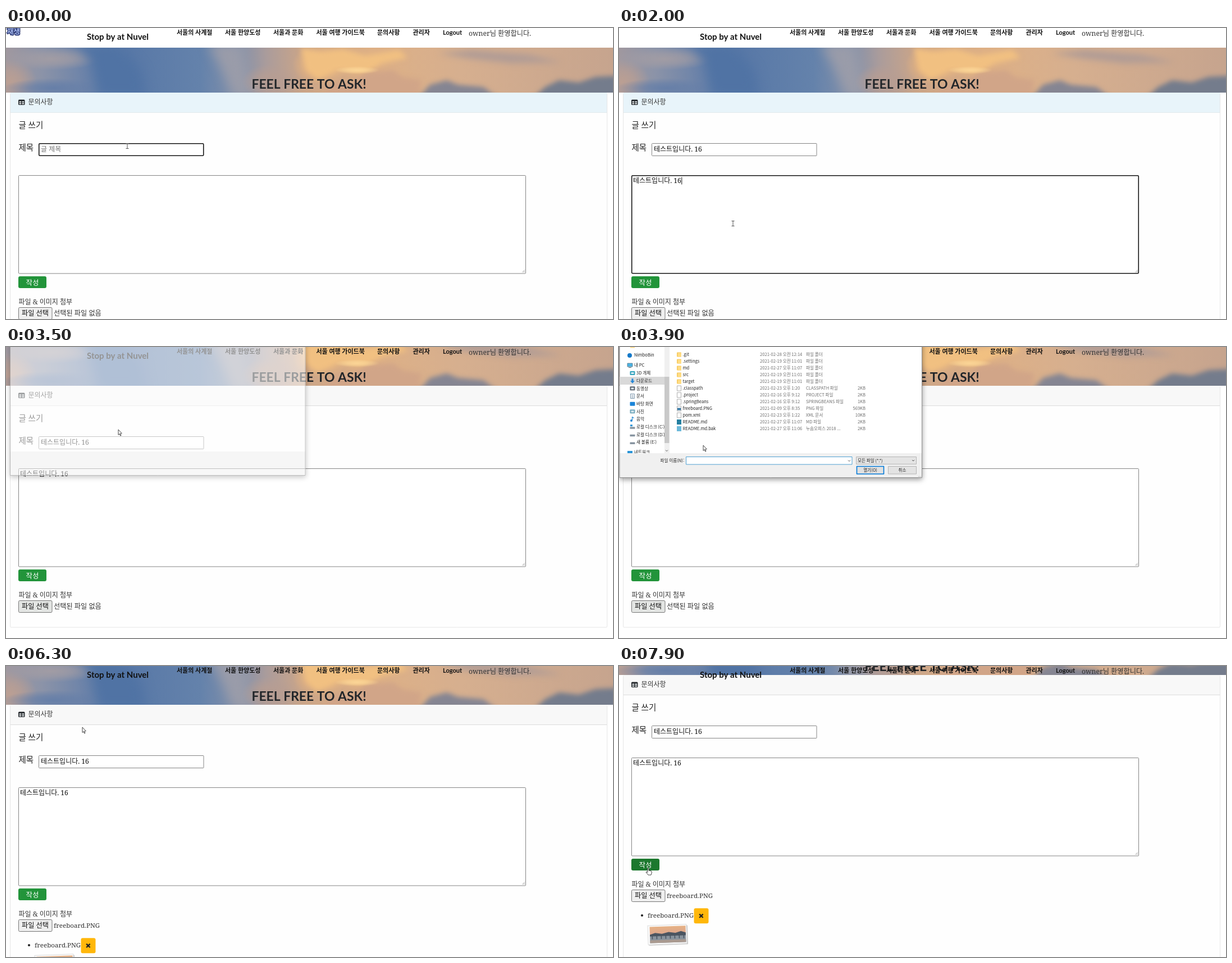
Recreate the animation shown at these times as an HTML page with a canvas. Size 1081 by 518 pixels, loop 8 s.

```html
<!DOCTYPE html>
<html lang="ko">
<head>
<meta charset="utf-8">
<title>Inquiry form</title>
<style>
  html, body { margin: 0; width: 100%; height: 100%; overflow: hidden; background: #fff; }
  canvas { display: block; }
</style>
</head>
<body>
<canvas id="stage" width="1081" height="518"></canvas>
<script>
const ctx = document.getElementById('stage').getContext('2d');
const LOOP = 8000, STEP = 100;
const SERIF = '"Noto Serif", "Noto Sans CJK KR", serif';
const SANS = 'Lato, "Noto Sans CJK KR", sans-serif';
const UI = '"Noto Sans CJK KR", "Noto Sans", sans-serif';
const MESSAGE = '테스트입니다. 16';
const FILE = 'freeboard.PNG';

// [time, x, y]: hot spot of the pointer
const POINTER = [
  [0, 216, 210], [900, 216, 210], [1200, 203, 348], [2000, 203, 348], [2200, 81, 465],
  [2700, 81, 465], [3000, 148, 266], [3500, 200, 147], [3700, 200, 147], [3900, 150, 175],
  [5700, 150, 175], [5800, 138, 98], [6000, 136, 109], [6300, 136, 109], [6400, 195, 271],
  [6500, 221, 303], [6600, 207, 357], [7200, 207, 357], [7400, 158, 367], [7700, 52, 360], [8000, 52, 360]
];
const SCROLL = [
  [0, 0], [2000, 0], [2100, 34], [2200, 46], [6700, 46], [6800, 57], [6900, 82], [7000, 99], [8000, 99]
];

function tween(keys, t) {
  const i = Math.max(1, keys.findIndex(k => k[0] >= t));
  const a = keys[i - 1], b = keys[i];
  const p = (t - a[0]) / (b[0] - a[0]);
  return a.slice(1).map((v, j) => v + (b[j + 1] - v) * p);
}

function rect(x, y, w, h, fill) {
  ctx.fillStyle = fill;
  ctx.fillRect(x, y, w, h);
}

function box(x, y, w, h, fill, stroke, radius = 0, line = 1) {
  ctx.beginPath();
  ctx.roundRect(x, y, w, h, radius);
  if (fill) { ctx.fillStyle = fill; ctx.fill(); }
  if (stroke) { ctx.strokeStyle = stroke; ctx.lineWidth = line; ctx.stroke(); }
}

function disc(x, y, r, fill) {
  ctx.beginPath();
  ctx.arc(x, y, r, 0, Math.PI * 2);
  ctx.fillStyle = fill;
  ctx.fill();
}

function path(points, fill, stroke, line = 1, close = true) {
  ctx.beginPath();
  points.forEach(([x, y]) => ctx.lineTo(x, y));
  if (close) ctx.closePath();
  if (fill) { ctx.fillStyle = fill; ctx.fill(); }
  if (stroke) { ctx.strokeStyle = stroke; ctx.lineWidth = line; ctx.stroke(); }
}

// y is the vertical middle of the line
function text(s, x, y, size = 12, color = '#333', family = SERIF, weight = 300, align = 'left') {
  ctx.font = `${weight} ${size}px ${family}`;
  ctx.textAlign = align;
  ctx.fillStyle = color;
  ctx.fillText(s, x, y + size * 0.37);
}

function glow(x, y, rx, ry, color) {
  ctx.save();
  ctx.translate(x, y);
  ctx.scale(rx, ry);
  const g = ctx.createRadialGradient(0, 0, 0, 0, 0, 1);
  g.addColorStop(0, color);
  g.addColorStop(0.45, color + 'b0');
  g.addColorStop(1, color + '00');
  disc(0, 0, 1, g);
  ctx.restore();
}

function cloud(points, color, blur) {
  ctx.filter = `blur(${blur}px)`;
  path(points, color);
  ctx.filter = 'none';
}

function paintSky() {
  const sky = ctx.createLinearGradient(0, 0, 1081, 0);
  [[0, '#a0989f'], [0.06, '#8b93a8'], [0.13, '#6c83a9'], [0.2, '#5878a7'], [0.32, '#6482ab'], [0.38, '#8190ab'],
   [0.43, '#ab9c9b'], [0.49, '#cba588'], [0.6, '#deb085'], [0.75, '#d6af8f'], [1, '#c6a48e']]
    .forEach(([p, c]) => sky.addColorStop(p, c));
  rect(0, 0, 1081, 80, sky);
  glow(5, 60, 50, 40, '#bb9f93');
  glow(80, 20, 90, 20, '#a19ca4');
  glow(85, 72, 90, 18, '#667fa8');
  cloud([[128, -8], [150, 20], [165, 88], [250, 88], [240, 40], [200, -8]], '#5073a4', 10);
  cloud([[360, -8], [420, -8], [440, 88], [405, 88], [385, 40]], '#9a9ca9', 10);
  glow(470, 60, 50, 30, '#b79d92');
  glow(560, 30, 50, 36, '#edb97f');
  cloud([[525, 0], [560, 8], [600, 2], [640, 14], [700, 4], [715, 18], [670, 28], [640, 46], [590, 40], [555, 56], [535, 40]], '#f1c081', 5);
  cloud([[565, 80], [585, 62], [620, 60], [640, 44], [690, 40], [705, 52], [740, 58], [735, 88], [560, 88]], '#d1a588', 4);
  glow(625, 40, 40, 7, '#fbd596');
  cloud([[735, 88], [755, 66], [785, 58], [805, 66], [850, 70], [875, 88]], '#858592', 4);
  cloud([[770, 10], [830, 4], [930, 12], [990, 26], [900, 28], [830, 20]], '#b19c95', 6);
  cloud([[940, 88], [960, 70], [985, 58], [1020, 62], [1050, 52], [1090, 50], [1090, 88]], '#747c8c', 4);
}

function drawBanner(top) {
  ctx.save();
  ctx.beginPath();
  ctx.rect(0, top, 1081, 80);
  ctx.clip();
  ctx.translate(0, top);
  paintSky();
  ctx.restore();
}

function drawNav() {
  text('Stop by at Nuvel', 144, 15, 15, '#111', SANS, 700);
  [['서울의 사계절', 304], ['서울 한양도성', 390], ['서울과 문화', 476], ['서울 여행 가이드북', 552.5],
   ['문의사항', 661], ['관리자', 724.5], ['Logout', 778]]
    .forEach(([label, x]) => text(label, x, 8, 11, '#111', SANS, 700));
  text('owner님 환영합니다.', 824, 9, 12.2, '#333');
}

function drawField(x, y, w, h, focused) {
  if (focused) box(x + 0.25, y + 0.25, w - 0.5, h - 0.5, '#fff', '#151515', 1.5, 1.6);
  else box(x, y, w, h, '#fff', '#858585', 1);
}

function drawThumbnail(y) {
  ctx.save();
  ctx.translate(86.5, y + 18.5);
  ctx.rotate(-0.035);
  box(-34, -16, 70, 34, '#c9c9c9', null, 1);
  box(-35, -17.5, 69, 34, '#fafafa', '#dedede');
  const sky = ctx.createLinearGradient(0, -15, 0, 0);
  sky.addColorStop(0, '#e6b184');
  sky.addColorStop(1, '#dda68f');
  rect(-31.5, -15, 64, 15, sky);
  rect(-31.5, -1, 64, 15, '#88929c');
  path([[-31.5, -1], [-22, -4], [-10, -2], [2, -5], [14, -3], [24, -6], [32.5, -3], [32.5, 2], [-31.5, 2]], '#4b5561');
  for (let x = -28; x < 32; x += 8) rect(x, 1, 1.5, 6, '#465260');
  rect(-31.5, 9, 64, 5, '#aa9a90');
  ctx.restore();
}

function drawPage(t, scroll, pointer) {
  const attached = t >= 6300;
  const dialogOpen = t >= 3400 && t < 6300;
  const titleFocus = t < 1000, bodyFocus = t >= 1000 && t < 2600;
  rect(0, 0, 1081, 518, '#fff');
  ctx.save();
  ctx.translate(0, -scroll);

  box(7.5, 115.5, 1063, attached ? 530 : 429.5, '#fefefe', '#e6e6e6', 2);
  rect(8, 115, 1062, 35, scroll ? '#f8f8f8' : '#e8f4fa');
  rect(8, 150, 1062, 1, scroll ? '#dcdcdc' : '#e1e9ec');
  drawBanner(35);
  text('FEEL FREE TO ASK!', 539.5, 99.3, 22.9, '#212529', SANS, 700, 'center');

  box(22, 127.5, 11.5, 9.5, '#212529', null, 1.5);
  [[23.5, 130.5], [28.5, 130.5], [23.5, 133.7], [28.5, 133.7]].forEach(([x, y]) => rect(x, y, 3.6, 2, '#f2f7f9'));
  text('문의사항', 39.5, 132);
  text('글 쓰기', 22.5, 173, 14.5, '#222');
  text('제목', 22.5, 213, 14.5, '#222');

  drawField(58.5, 205.5, 293.5, 22, titleFocus);
  const titled = MESSAGE.slice(0, Math.min(10, Math.round(t / 90)));
  if (titled) text(titled, 62, 215.5, 12, '#111');
  else text('글 제목', 62, 215.5, 12, '#757575');

  drawField(22.5, 262.5, 903, 174.5, bodyFocus);
  const body = MESSAGE.slice(0, Math.max(0, Math.floor((t - 1000) / 80)));
  text(body, 25, 272, 12, '#111');
  if (bodyFocus && t < 2100) rect(25.5 + ctx.measureText(body).width, 265.5, 1, 13, '#111');
  path([[919.5, 435], [924, 430.5]], null, '#888', 0.8, false);
  path([[922, 435], [924, 433]], null, '#888', 0.8, false);

  const pressable = !dialogOpen && pointer[0] > 22 && pointer[0] < 72
    && pointer[1] + scroll > 441 && pointer[1] + scroll < 464;
  box(22, 442, 50, 21, pressable ? '#1c782e' : '#22943a', null, 3);
  text('작성', 47, 453.8, 12.5, '#fff', SERIF, 300, 'center');

  text('파일 & 이미지 첨부', 22.5, 488);
  const hot = t >= 2200 && t < 6300;
  box(22.5, 497.5, 59.5, 21, hot ? '#e3e5e3' : '#efefef', '#767676', 2);
  text('파일 선택', 52, 507.5, 12.2, '#111', SERIF, 300, 'center');
  if (!attached) text('선택된 파일 없음', 85, 507.5, 12.2);
  else {
    text(FILE, 85, 507.7, 11.6);
    disc(41, 543, 2.1, '#222');
    text(FILE, 51, 542.7, 11.6);
    box(133.5, 530.3, 26, 27, '#ffb70b', null, 3);
    path([[143.2, 540.6], [149.6, 547]], null, '#222', 2.4, false);
    path([[149.6, 540.6], [143.2, 547]], null, '#222', 2.4, false);
    drawThumbnail(559);
  }
  ctx.restore();
}

const FILES = [
  ['.git', '28 오전 12:14', '파일 폴더'],
  ['.settings', '19 오전 11:01', '파일 폴더'],
  ['md', '27 오후 11:07', '파일 폴더'],
  ['src', '19 오전 11:01', '파일 폴더'],
  ['target', '19 오전 11:01', '파일 폴더'],
  ['.classpath', '23 오후 1:20', 'CLASSPATH 파일', '2KB'],
  ['.project', '16 오후 9:12', 'PROJECT 파일', '2KB'],
  ['.springBeans', '16 오후 9:12', 'SPRINGBEANS 파일', '1KB'],
  [FILE, '09 오후 8:35', 'PNG 파일', '569KB'],
  ['pom.xml', '23 오후 1:22', 'XML 문서', '10KB'],
  ['README.md', '27 오후 11:07', 'MD 파일', '2KB'],
  ['README.md.bak', '27 오후 11:06', '누솜오피스 2018 ...', '2KB']
];
const PLACES = [
  ['3D 개체', '#35a4bd'], ['다운로드', '#2587d6'], ['동영상', '#5b6470'], ['문서', '#7c96ab'], ['바탕 화면', '#1a84d8'],
  ['사진', '#74a9bd'], ['음악', '#2186d2'], ['로컬 디스크 (C:)', '#8794a0'], ['로컬 디스크 (D:)', '#8794a0'], ['새 볼륨 (E:)', '#8794a0']
];

function label(s, x, y, color = '#222', align = 'left') {
  text(s, x, y, 7.6, color, UI, 400, align);
}

function chevron(x, y) {
  path([[x - 2, y - 1], [x, y + 1], [x + 2, y - 1]], null, '#555', 1, false);
}

function drawFileIcon(i, y) {
  if (i < 5) {
    box(103, y - 4, 8, 8, '#f5c85d', null, 1);
    rect(104.5, y - 3, 6.5, 7, '#ffdc83');
  } else if (i >= 10) {
    rect(103, y - 4.5, 8, 9, i === 10 ? '#247fa0' : '#6bb9da');
  } else {
    box(103.5, y - 4.5, 7, 9, '#fff', '#9a9a9a', 0, 0.8);
    if (i === 8) rect(104, y - 1, 6, 4, '#397ca8');
  }
}

function drawPlaceIcon(i, y, color) {
  if (i === 1) {
    path([[22.5, y - 4], [25.5, y - 4], [25.5, y], [28, y], [24, y + 4.5], [20, y], [22.5, y]], color);
  } else if (i === 6) {
    disc(22, y + 2.5, 2, color);
    path([[23.5, y + 2], [23.5, y - 4], [26.5, y - 2]], null, color, 1.2, false);
  } else if (i > 6) {
    box(19.5, y, 9, 3.5, color, null, 0.5);
    if (i === 7) rect(20, y - 4, 4, 3, '#2a94d6');
  } else if (i === 3) {
    box(20.5, y - 4, 7, 8, '#fff', color);
    for (let k = -2; k < 4; k += 2) rect(22, y + k, 4, 0.8, color);
  } else {
    box(19.5, y - 3.5, 9, 7, color, null, 1);
    if (i !== 4) rect(21.5, y - 1.5, 5, 3, '#dceaf0');
  }
}

function drawSidebar() {
  ctx.save();
  ctx.beginPath();
  ctx.rect(1, 0, 80, 189);
  ctx.clip();
  rect(20, 0, 8, 1.5, '#ffdc83');
  disc(19, 15, 4, '#1479c9');
  label('NimboBin', 27, 14.5);
  box(15, 29, 9, 6, '#4ab5e6', '#56707e', 0, 0.8);
  rect(17, 36, 5, 1, '#56707e');
  label('내 PC', 27, 32.5);
  rect(1, 53, 80, 14, '#d9d9d9');
  PLACES.forEach(([name, color], i) => {
    const y = 46.5 + i * 13.67;
    drawPlaceIcon(i, y, color);
    label(name, 31, y);
  });
  box(15, 185, 9, 5, '#2a94d6');
  label('네트워크', 27, 187.5);
  ctx.restore();
  rect(81, 0, 9, 189, '#f0f0f0');
  rect(81, 53, 8.5, 118, '#c9c9c9');
  chevron(85, 184.5);
}

function drawFiles(hovered, selected) {
  FILES.forEach(([name, date, kind, size], i) => {
    const y = 13.5 + i * 12;
    if (i === selected) rect(101, y - 6, 340, 12, '#cce8ff');
    else if (i === hovered) rect(101, y - 6, 340, 12, '#e5f3ff');
    drawFileIcon(i, y);
    label(name, 113.5, y);
    label('2021-02-' + date, 251, y, '#6d6d6d');
    label(kind, 333, y, '#6d6d6d');
    if (size) label(size, 439, y, '#6d6d6d', 'right');
  });
}

// The shadow stays outside the window so that it does not show through while fading
function drawWindowShadow() {
  ctx.save();
  ctx.beginPath();
  ctx.rect(-50, -50, 1200, 650);
  ctx.rect(1, -30, 539, 263);
  ctx.clip('evenodd');
  ctx.shadowColor = 'rgba(0,0,0,.4)';
  ctx.shadowBlur = 9;
  ctx.shadowOffsetY = 3;
  rect(1, -30, 539, 263, '#fff');
  ctx.restore();
}

function drawDialog(t) {
  const opening = t < 3600, closing = t >= 6200;
  ctx.save();
  if (opening || closing) {
    ctx.globalAlpha = t === 3400 ? 0.15 : 0.55;
    ctx.translate(270.5, 66);
    ctx.scale(0.976, 0.976);
    ctx.translate(-270.5, -66);
  }
  drawWindowShadow();
  rect(1, -30, 539, 219, '#fff');
  rect(1, 189, 539, 44, '#f0f0f0');
  box(1, -30, 538.5, 262.5, null, '#8c8c8c');
  if (!opening) {
    drawSidebar();
    drawFiles(t >= 5800 && t < 6000 ? 7 : -1, t >= 6000 ? 8 : -1);
    label('파일 이름(N):', 116, 202, '#222', 'right');
    box(119.5, 195.5, 295.5, 13.5, '#fff', '#4fa0d2');
    box(422.5, 195.5, 107, 13, '#e4e4e4', '#b5b5b5');
    box(423.5, 212.5, 48, 13.5, '#e1e1e1', '#0078d7', 0, 1.6);
    box(479.5, 212.5, 50, 13.5, '#e3e3e3', '#b5b5b5');
    if (t >= 6000) label(FILE, 122, 202);
    chevron(410, 202.5);
    label('모든 파일 (*.*)', 425, 202);
    chevron(524, 202);
    label('열기(O)', 447.5, 219, '#222', 'center');
    label('취소', 504.5, 219, '#222', 'center');
    for (let k = 0; k < 3; k++) rect(537 - k * 2, 230, 1, 1, '#aaa');
  }
  ctx.restore();
}

function drawPointer(kind, x, y) {
  ctx.save();
  ctx.translate(x, y);
  if (kind === 'text') {
    path([[-2.5, -4.5], [2.5, -4.5]], null, '#555', 1, false);
    path([[0, -4.5], [0, 4.5]], null, '#555', 1, false);
    path([[-2.5, 4.5], [2.5, 4.5]], null, '#555', 1, false);
  } else if (kind === 'hand') {
    path([[-1, 0], [1, 0], [1, 4], [5.5, 5], [6.5, 7], [5, 12], [0, 12], [-4, 7], [-3, 6], [-1, 7.5]], '#fff', '#333', 0.9);
  } else {
    path([[0, 0], [0, 9.5], [2.1, 7.6], [3.6, 11], [5, 10.4], [3.5, 7], [6.3, 6.8]], '#fff', '#333', 0.9);
  }
  ctx.restore();
}

function pointerKind(t, x) {
  if (t < 2100 || (t >= 6400 && t < 7400)) return 'text';
  return t >= 7400 && x < 72 ? 'hand' : 'arrow';
}

function drawPlayBadge() {
  ctx.font = `900 12.5px ${UI}`;
  ctx.textAlign = 'left';
  ctx.lineJoin = 'round';
  ctx.lineWidth = 3;
  ctx.strokeStyle = '#26336e';
  ctx.strokeText('재생', 2, 11);
  ctx.fillStyle = '#a9bdf2';
  ctx.fillText('재생', 2, 11);
}

function draw(now) {
  const t = Math.floor((now % LOOP) / STEP) * STEP;
  const pointer = tween(POINTER, t);
  drawPage(t, Math.round(tween(SCROLL, t)[0]), pointer);
  drawNav();
  if (t >= 3400 && t < 6300) drawDialog(t);
  if (t < 500) drawPlayBadge();
  drawPointer(pointerKind(t, pointer[0]), ...pointer);
  requestAnimationFrame(draw);
}

requestAnimationFrame(draw);
</script>
</body>
</html>
```
